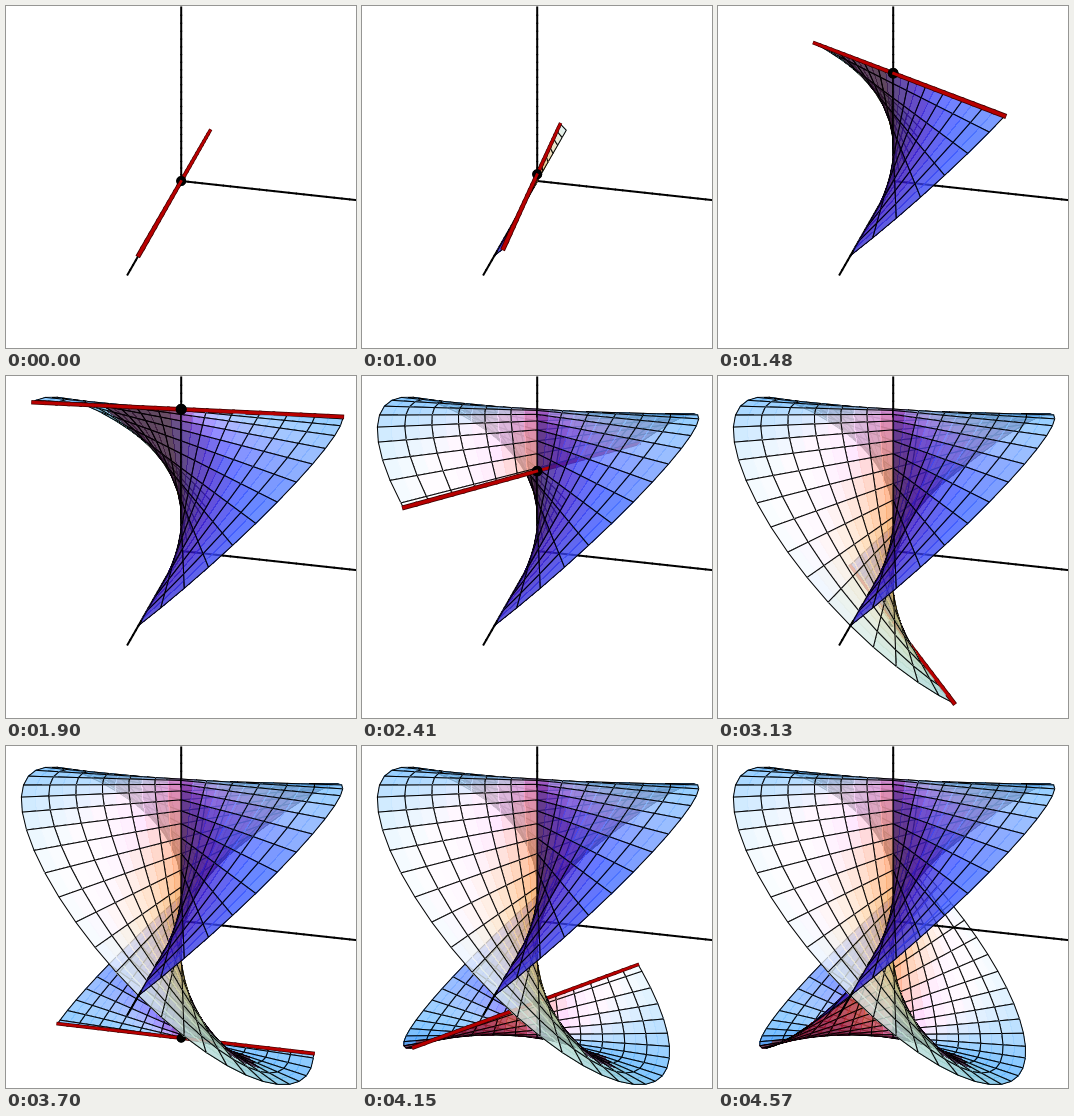
A matplotlib script that plays this animation: 350x342 px, repeating every 7.57 s.

```python
import numpy as np
import matplotlib.pyplot as plt
from matplotlib.animation import FuncAnimation
from matplotlib.collections import PolyCollection

WIDTH, HEIGHT, DPI = 350, 342, 64
PX = 72 / DPI
TICK, LOOP = 10, 7570
HOLD, STEP, STEPS = 1000, 30, 120
CELL = 2.5                      # animation steps per mesh cell
RINGS = 12                      # mesh cells along a ruling
SCALE, CENTER = 142.7, np.array([175.2, 175.0])

EYE = np.array([4.0, 1.0, 2.0])
VIEW = EYE / np.linalg.norm(EYE)
RIGHT = np.array([-1.0, 4.0, 0.0]) / np.sqrt(17)
UP = np.cross(VIEW, RIGHT)

AMBIENT = np.array([0.20, 0.08, 0.20])
LIGHT_RGB = np.array([0.80, 0.85, 1.00])
LIGHT_DIR = np.array([[1, 0, 1], [1, 1, 1], [0, 1, 1]], float)
LIGHT_DIR /= np.linalg.norm(LIGHT_DIR, axis=1, keepdims=True)
OPACITY = 0.79
BLACK, DARK_RED, RED = (0, 0, 0, 1), (0.25, 0, 0, 1), (0.72, 0, 0, 1)


def project(points):
    """Perspective projection to stage pixels, plus relative depth."""
    depth = 1 - points @ EYE / (EYE @ EYE)
    flat = np.stack([points @ RIGHT, -(points @ UP)], -1)
    return CENTER + SCALE * flat / depth[..., None], depth


def ruled(radius, angle):
    """Points of the conoid z = sin(angle)."""
    radius, angle = np.broadcast_arrays(radius, angle)
    return np.stack([radius * np.cos(angle), radius * np.sin(angle),
                     np.sin(angle)], -1)


def shade(radius, angle):
    c, s = np.cos(angle), np.sin(angle)
    normal = np.stack(np.broadcast_arrays(s * c, -c * c, radius), -1)
    normal = normal / np.linalg.norm(normal, axis=-1, keepdims=True)
    normal = normal * np.where(normal @ VIEW < 0, -1, 1)[..., None]
    facing = normal @ np.stack([RIGHT, UP, VIEW], 1)
    diffuse = np.clip(facing @ LIGHT_DIR.T, 0, 1) * LIGHT_RGB
    rgb = AMBIENT + diffuse + 0.2 * facing[..., 2:] ** 3
    alpha = np.full(rgb.shape[:-1] + (1,), OPACITY)
    return np.concatenate([np.clip(rgb, 0, 1), alpha], -1)


def corners(grid):
    return np.stack([grid[:-1, :-1], grid[:-1, 1:],
                     grid[1:, 1:], grid[1:, :-1]], 2)


def part(verts, faces, widths, smooth, depth):
    count = len(verts)
    return (verts, np.broadcast_to(faces, (count, 4)),
            np.broadcast_to(widths, count), np.broadcast_to(smooth, count),
            np.broadcast_to(depth, count))


def surface(step):
    angle = np.append(np.arange(0, step, CELL), step) * 2 * np.pi / STEPS
    radius = np.linspace(-1, 1, 2 * RINGS + 1)
    xy, depth = project(ruled(radius, angle[:, None]))
    rows = len(angle) - 1
    shape = (rows, RINGS)
    fills = corners(xy).reshape(shape + (2, 4, 2))
    outline = corners(xy[:, ::2])[:, :, None]
    mid_r = (radius[1:] + radius[:-1]) / 2
    mid_a = (angle[1:] + angle[:-1]) / 2
    colors = shade(mid_r, mid_a[:, None]).reshape(shape + (2, 4))
    colors = np.concatenate([colors, np.zeros(shape + (1, 4))], 2)
    order = corners(depth[:, ::2]).mean(-1)
    cells = rows * RINGS
    verts = np.concatenate([fills, outline], 2).reshape(cells * 3, 4, 2)
    return part(verts, colors.reshape(cells * 3, 4),
                np.tile([0, 0, 1.0 * PX], cells),
                np.tile([False, False, True], cells),
                np.repeat(order.ravel(), 3))


def ribbon(points, color, width, nearer=0.0, taper=False):
    """A straight stroke in short pieces, so it can pass behind the sheet."""
    xy, depth = project(points)
    a, b = xy[:-1], xy[1:]
    middle = (depth[:-1] + depth[1:]) / 2
    size = (width / middle if taper else np.full(len(a), width))[:, None]
    along = (b - a) / np.linalg.norm(b - a, axis=1, keepdims=True)
    side = along[:, ::-1] * [-1, 1] * size / 2
    a, b = a - along * size * 0.3, b + along * size * 0.3
    verts = np.stack([a + side, b + side, b - side, a - side], 1)
    return part(verts, color, 0, True, middle - nearer)


def ball(point, radius, nearer):
    xy, depth = project(point)
    turn = np.arange(12)[:, None] * np.pi / 6 + np.arange(3) * np.pi / 6
    rim = xy + radius / depth * np.stack([np.cos(turn), np.sin(turn)], -1)
    verts = np.concatenate([np.tile(xy, (12, 1, 1)), rim], 1)
    return part(verts, BLACK, 0, True, depth - nearer)


def scene(step):
    reach = np.linspace(0, 1.2, 25)[:, None]
    parts = [ribbon(reach * axis, BLACK, 2.0) for axis in np.eye(3)]
    parts.append(surface(step))
    if step < STEPS:
        angle = step * 2 * np.pi / STEPS
        rod = ruled(np.linspace(-1, 1, 25), angle)
        parts.append(ribbon(rod, DARK_RED, 4.1, 0.01, True))
        parts.append(ribbon(rod, RED, 2.7, 0.04, True))
        parts.append(ball(rod[12], 5.0, 0.045))
    columns = [np.concatenate(column) for column in zip(*parts)]
    order = np.argsort(-columns[-1], kind="stable")
    return [column[order] for column in columns[:-1]]


fig = plt.figure(figsize=(WIDTH / DPI, HEIGHT / DPI), dpi=DPI,
                 facecolor="white")
ax = fig.add_axes([0, 0, 1, 1])
ax.set_xlim(0, WIDTH)
ax.set_ylim(HEIGHT, 0)
ax.axis("off")
shapes = PolyCollection([], edgecolors="black", joinstyle="round")
shapes.set_snap(False)
ax.add_collection(shapes, autolim=False)
shown = {"step": None}


def update(frame):
    time = frame * TICK
    step = 0 if time < HOLD else min(1 + (time - HOLD) // STEP, STEPS)
    if step != shown["step"]:
        verts, faces, widths, smooth = scene(step)
        shapes.set_verts(verts)
        shapes.set_facecolor(faces)
        shapes.set_linewidth(widths)
        shapes.set_antialiased(smooth)
        shown["step"] = step
    return [shapes]


anim = FuncAnimation(fig, update, frames=LOOP // TICK, interval=TICK,
                     repeat=True, repeat_delay=0, blit=False,
                     cache_frame_data=False)
plt.show()
```
